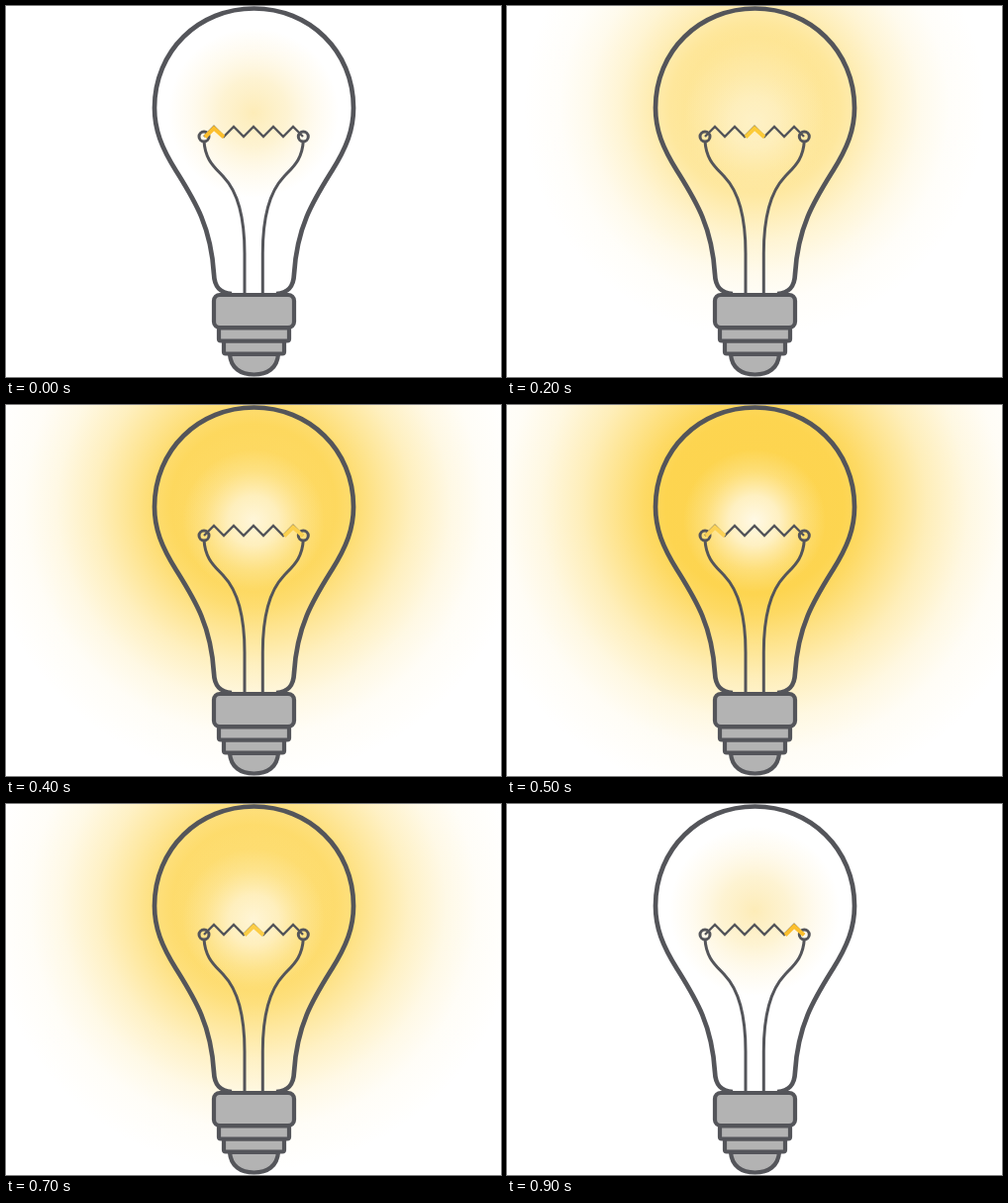
Write an HTML page that moves like this. It is 500 by 375 pixels and loops after 1 s.

```html
<!DOCTYPE html>
<html lang="en">
<head>
<meta charset="utf-8">
<title>Light bulb</title>
<style>
  html, body { margin: 0; width: 100%; height: 100%; overflow: hidden; background: #fff; }
  svg { display: block; width: 100vw; height: 100vh; animation: glow 1s step-end infinite; }

  .halo { transform-origin: 250px 102px; transform: scale(var(--size)); opacity: var(--halo); }
  .core { opacity: var(--core); }
  .warm { opacity: calc(1 - var(--core)); }
  .spark { fill: none; stroke: var(--tint); stroke-width: 4; animation: run .5s steps(5, end) infinite; }
  .line { fill: none; stroke: #54555a; stroke-linejoin: round; }
  .glass { stroke-width: 4.7; }
  .wire { stroke-width: 3; }
  .coil { stroke-width: 2.3; stroke-linejoin: miter; }
  .base { fill: #b3b3b3; stroke: #54555a; stroke-width: 4.2; stroke-linejoin: round; }

  @keyframes glow {
    0%  { --halo: 0;   --size: .5;  --core: 0;   --tint: #fcbf2d; }
    10% { --halo: .45; --size: .68; --core: .3;  --tint: #fcc631; }
    20% { --halo: .63; --size: .78; --core: .5;  --tint: #fccb38; }
    30% { --halo: .8;  --size: .86; --core: .7;  --tint: #fcce44; }
    40% { --halo: .92; --size: .92; --core: .85; --tint: #fbd04f; }
    50% { --halo: 1;   --size: 1;   --core: .95; --tint: #fcd256; }
    60% { --halo: .94; --size: .95; --core: .9;  --tint: #fcd050; }
    70% { --halo: .84; --size: .9;  --core: .8;  --tint: #fccd46; }
    80% { --halo: .55; --size: .75; --core: .45; --tint: #fcc633; }
    90%, 100% { --halo: 0; --size: .5; --core: 0; --tint: #fcbf2d; }
  }
  @keyframes run { to { transform: translateX(100px); } }
</style>
</head>
<body>
<svg viewBox="0 0 500 375" preserveAspectRatio="none">
  <defs>
    <radialGradient id="haloFill">
      <stop offset="0" stop-color="#fdd349"/>
      <stop offset=".3" stop-color="#fdd349" stop-opacity=".96"/>
      <stop offset=".37" stop-color="#fdd349" stop-opacity=".85"/>
      <stop offset=".47" stop-color="#fdd349" stop-opacity=".62"/>
      <stop offset=".58" stop-color="#fdd349" stop-opacity=".38"/>
      <stop offset=".72" stop-color="#fdd349" stop-opacity=".16"/>
      <stop offset=".84" stop-color="#fdd349" stop-opacity=".05"/>
      <stop offset="1" stop-color="#fdd349" stop-opacity="0"/>
    </radialGradient>
    <radialGradient id="warmFill">
      <stop offset="0" stop-color="#fdebb4" stop-opacity=".95"/>
      <stop offset=".4" stop-color="#fdeebf" stop-opacity=".7"/>
      <stop offset=".75" stop-color="#fef2cf" stop-opacity=".3"/>
      <stop offset="1" stop-color="#fef2cf" stop-opacity="0"/>
    </radialGradient>
    <radialGradient id="coreFill">
      <stop offset="0" stop-color="#fffbee"/>
      <stop offset=".35" stop-color="#fff9e6" stop-opacity=".8"/>
      <stop offset=".7" stop-color="#fff6d8" stop-opacity=".3"/>
      <stop offset="1" stop-color="#fff6d8" stop-opacity="0"/>
    </radialGradient>
    <g id="side" class="line wire">
      <path d="M200 136C201 156 211 163 220 173C237 191 241 220 241 250V291"/>
      <circle cx="200" cy="132" r="5"/>
    </g>
  </defs>

  <circle class="halo" cx="250" cy="102" r="300" fill="url(#haloFill)"/>
  <circle class="warm" cx="250" cy="108" r="86" fill="url(#warmFill)"/>
  <circle class="core" cx="250" cy="117" r="72" fill="url(#coreFill)"/>

  <use href="#side"/>
  <use href="#side" transform="matrix(-1 0 0 1 500.3 0)"/>
  <path class="line coil" d="M200 132l10-10 10 10 10-10 10 10 10-10 10 10 10-10 10 10 10-10 10 10"/>
  <path class="spark" d="M201 132.5L210 123.5L220 132.5"/>

  <path class="line glass" d="M228 291C216 290 210.5 284 210 271C207 222 190 196 172 167C157 143 150 125 150 103C150 45 195 2.5 250.5 2.5C306 2.5 351 45 351 103C351 125 344 143 329 167C311 196 294 222 291 271C290.5 284 285 290 273 291"/>

  <g class="base">
    <path d="M226 352H275C274 366 264 372.5 250.5 372.5C237 372.5 227 366 226 352Z"/>
    <rect x="220" y="338.5" width="61" height="13" rx="2"/>
    <rect x="215" y="325.5" width="71" height="13" rx="2"/>
    <rect x="210" y="292" width="81" height="33" rx="6"/>
  </g>
</svg>
</body>
</html>
```
